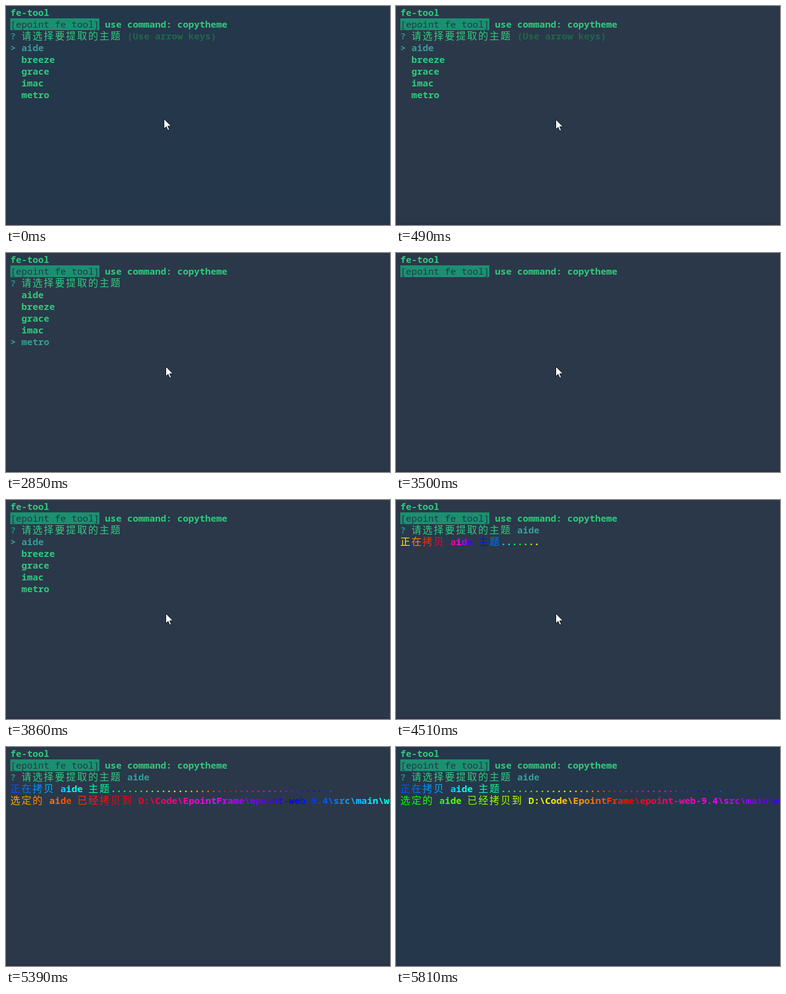
An HTML page that plays this animation: 621 by 354 pixels, repeating every 5.91 s.

```html
<!DOCTYPE html>
<html lang="zh-CN">
<head>
<meta charset="utf-8">
<title>fe-tool copytheme</title>
<style>
  html, body { margin: 0; width: 100%; height: 100%; overflow: hidden; }
  body { background: #2a384a; }
  body.clean { background: #25374b; }
  #stage { position: absolute; left: 0; top: 0; width: 621px; height: 354px; overflow: hidden; }
  #stage::after {
    content: ""; position: absolute; left: 0; right: 0; bottom: 0; height: 3px; background: #2b3146;
  }
  #screen {
    position: absolute; left: 7px; top: 1px;
    font: 600 15px/19px "Noto Sans Mono", "DejaVu Sans Mono", monospace;
    font-variant-ligatures: none;
    white-space: pre; color: #2fcc7c;
  }
  #screen div { height: 19px; }
  #screen i {
    font: 400 16px/0 "Noto Sans CJK SC", "Noto Sans CJK", "Noto Sans CJK JP", sans-serif;
    letter-spacing: 2px;
  }
  .badge { display: inline-block; height: 19px; background: #1b9070; color: #25374b; font-weight: 500; }
  .mark { color: #21907c; }
  .pick { color: #369f98; }
  .hint { color: #1f684c; }
  #pointer { position: absolute; left: 0; top: 0; overflow: visible; }
</style>
</head>
<body>
<div id="stage">
  <div id="screen"></div>
  <svg id="pointer" width="13" height="20">
    <path d="M.5 .5V16.5L4.2 13L6.8 19L9.3 18L6.8 12.1H12Z" fill="#fff" stroke="#101820"/>
  </svg>
</div>
<script>
const LOOP = 5910;
const ENTER = 4370;
const COPIED = 5048;
const THEMES = ['aide', 'breeze', 'grace', 'imac', 'metro'];
const DONE = '选定的 aide 已经拷贝到 D:\\Code\\EpointFrame\\epoint-web-9.4\\src\\main\\webapp';
const DONE_LENGTH = 90; // printed characters, including those beyond the right edge

// [start, selected theme]; -1 is the moment the prompt is erased for a redraw
const SELECTION = [
  [0, 0], [1040, 1], [1410, 0], [1720, 1], [2080, 2], [2460, 3], [2850, 4], [3160, 3],
  [3350, 2], [3500, -1], [3560, 1], [3810, -1], [3860, 0]
];
const POINTER = [
  [0, [255, 182]], [310, [249, 176]], [370, [245, 172]], [430, [252, 178]], [490, [258, 183]]
];

const screen = document.getElementById('screen');
const pointer = document.getElementById('pointer');

const at = (track, t) => track.filter(([start]) => start <= t).pop()[1];
const wide = text => text.replace(/[\u4e00-\u9fff]+/g, '<i>$&</i>');
const tag = (name, text) => `<span class="${name}">${wide(text)}</span>`;

// The output refreshes in short, hard steps
function snap(t) {
  const [start, step] = t < 4990 ? [ENTER, 56] : t < 5630 ? [4990, 58] : [5630, 60];
  const limit = t < 4990 ? 10 : t < 5630 ? 10 : 3;
  return start + step * Math.min(limit, Math.floor((t - start) / step));
}

function rainbow(text, hue, length = text.replace(/\s/g, '').length) {
  const turn = 359 / (length - 1);
  let index = 0;
  return [...text].map(char => char === ' ' ? char :
    `<span style="color:hsl(${(hue - turn * index++ + 720) % 360} 100% 50%)">${wide(char)}</span>`
  ).join('');
}

function promptLines(t) {
  const selected = at(SELECTION, t);
  if (selected < 0) return [];
  const hint = t < 1040 ? tag('hint', ' (Use arrow keys)') : '';
  return [
    tag('mark', '?') + wide(' 请选择要提取的主题') + hint,
    ...THEMES.map((name, i) => i === selected ? tag('pick', '> ' + name) : '  ' + name)
  ];
}

function copyLines(t) {
  const dots = Math.min(40, Math.round((t - ENTER) / 16));
  const lines = [
    tag('mark', '?') + wide(' 请选择要提取的主题 ') + tag('pick', 'aide'),
    rainbow('正在拷贝 aide 主题' + '.'.repeat(dots), 5 * (dots + 4))
  ];
  if (t >= COPIED) {
    const hue = 5 * Math.max(0, Math.round((t - 5090) / 30));
    lines.push(rainbow(DONE, hue, DONE_LENGTH));
  }
  return lines;
}

function placePointer(t) {
  const [x, y] = at(POINTER, t);
  const exit = Math.max(0, (t - 4990) / 340);
  pointer.style.display = exit < 1 ? '' : 'none';
  pointer.style.transform = `translate(${Math.round(x + 370 * exit)}px, ${Math.round(y + 34 * exit)}px)`;
}

let shown = '';
function render(time) {
  const t = time < ENTER ? time : snap(time);
  const html = [
    'fe-tool',
    tag('badge', '[epoint fe tool]') + ' use command: copytheme',
    ...(t < ENTER ? promptLines(t) : copyLines(t))
  ].map(line => `<div>${line}</div>`).join('');
  if (html !== shown) screen.innerHTML = shown = html;
  placePointer(t);
  document.body.classList.toggle('clean', t < 310 || t >= 5810);
}

let origin;
function tick(now) {
  origin ??= now;
  render((now - origin) % LOOP);
  requestAnimationFrame(tick);
}
render(0);
requestAnimationFrame(tick);
</script>
</body>
</html>
```
